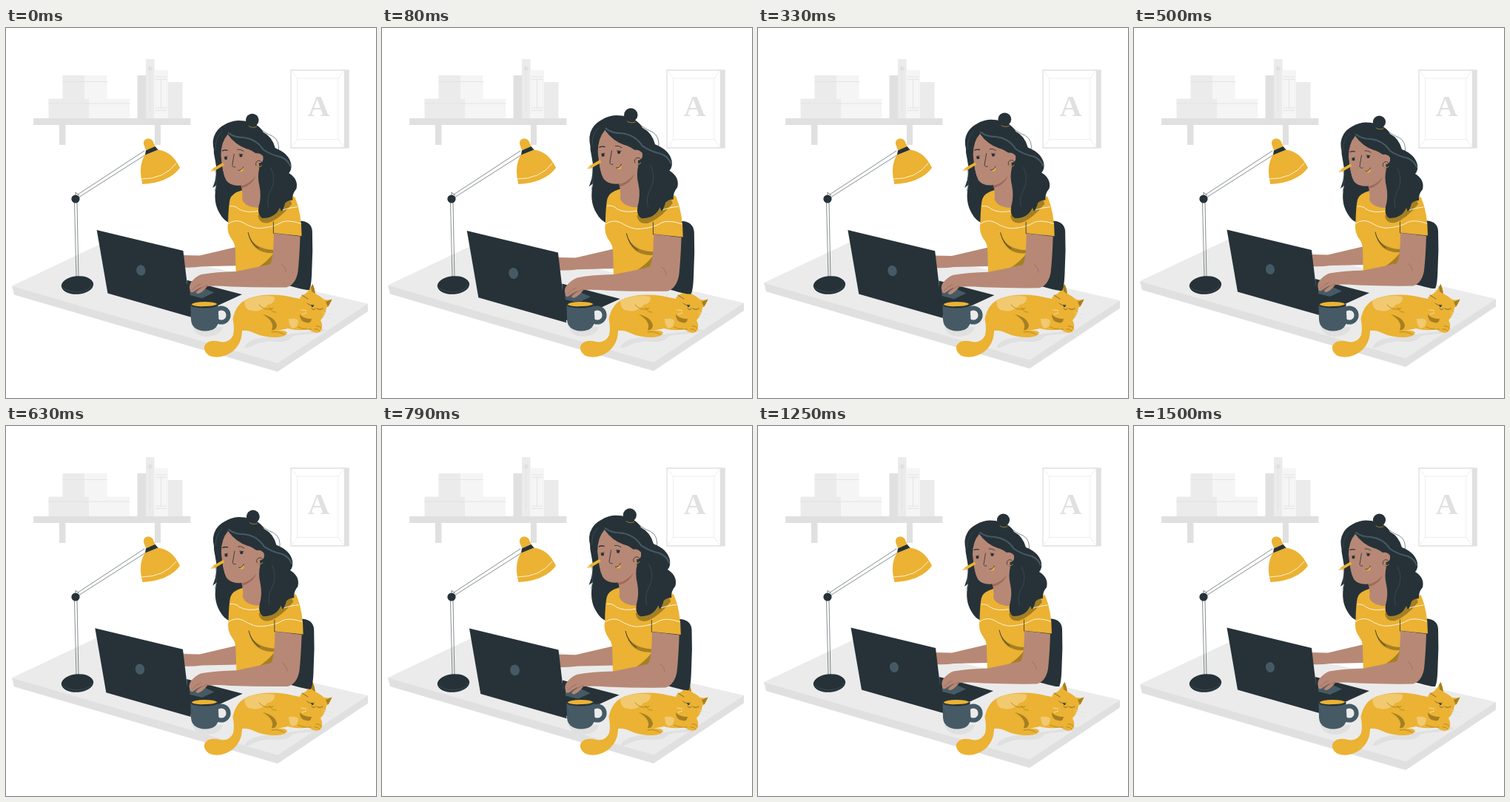
Write an HTML page that moves like this. It is 500 by 500 pixels and loops after 1540 ms.

```html
<!DOCTYPE html>
<html lang="en">
<head>
<meta charset="utf-8">
<title>Working at home</title>
<style>
  html, body { margin: 0; width: 100%; height: 100%; overflow: hidden; background: #fff; }
  svg { display: block; width: 100vw; height: 100vh; }
  .ink { fill: #263238; }
  .slate { fill: #455a64; }
  .gold { fill: #ebb233; }
  .umber { fill: #a57f22; }
  .cream { fill: #f1c96f; }
  .skin { fill: #b78876; }
  .blush { fill: #a06a59; }
  .g1 { fill: #e0e0e0; }
  .g2 { fill: #ebebeb; }
  .g3 { fill: #f5f5f5; }
  .line { fill: none; stroke: #263238; stroke-width: .8; stroke-linecap: round; stroke-linejoin: round; }
  .thin { stroke-width: .55; }
  .bold { stroke-width: 1.3; }
  .pale { stroke: #e0e0e0; }
  .white { stroke: #fff; }
  .steel { stroke: #455a64; }
  .fold { stroke: #a06a59; }
  .brown { stroke: #a57f22; }
  .amber { stroke: #ebb233; }
  #worker { transform-origin: 268px 253px; }
</style>
</head>
<body>
<svg viewBox="0 0 500 500">
  <g id="shelf">
    <path class="g1" d="M37 122h212.500v9H37zM72 131h8.500v27H72zM201 131h8v27h-8zM177.500 64H189v58h-11.500z"/>
    <path class="g2" d="M76.500 64H106v31.500H76.500zM57.500 95.500H112V122H57.500zM189 42h11.500v80H189zM219 73h19.500v49H219z"/>
    <path class="g3" d="M106 64h30.500v31.500H106zM112 95.500h55V122h-55zM200.500 57H219v65h-18.500z"/>
    <path class="line pale" d="M76.500 72.500h60M57.500 102h109.500M194.500 60v52M202 66h15M202 69.500h15M202 108h15M202 111.500h15M209.500 70v38"/>
    <circle class="g1" cx="194.500" cy="55" r="3"/>
  </g>

  <g id="picture">
    <path class="g1" d="M457.500 56.500h6.300v106h-6.300z"/>
    <path class="line pale bold" d="M385 57h72.500v105H385z"/>
    <path class="line pale thin" d="M394 68h55v82.500h-55zM385 57l9 11M457.500 57l-8.500 11M385 162l9-11.500M457.500 162l-8.500-11.500"/>
    <text class="g1" x="422.500" y="119" text-anchor="middle" font-family="'Liberation Serif', serif" font-weight="700" font-size="41">A</text>
  </g>

  <g id="desk">
    <path class="g2" d="M8 349L133 290L489 373L367 454z"/>
    <path class="g1" d="M8 349L367 453.500L489 373V383.500L367 465L11 361z"/>
  </g>

  <path class="g1" d="M252 404Q256 417 272 417Q290 416 293 404zM322 432Q327 420 350 418L388 413L430 407Q437 408 424 412L388 416Q380 426 366 424Q350 422 336 428Q328 433 322 432z"/>

  <g id="cat">
    <path class="gold" d="M306.500 393Q311 371 329 365Q350 358 378 362L397 366Q398 361 405 359Q411 353 414.500 346Q417 352 418 359Q424 362 430 367Q436 368 440.500 366.500Q438 375 433 378Q432 388 425 395Q428 401 427 404Q428 410 420 412Q413 411 409 407Q395 410 381 406Q372 408 366 409Q378 408 380 412Q379 417 366 418Q347 418 335 412Q326 408 319 409Q319 427 305 438Q290 448 275 443Q267 438 268 430Q272 421 285 423Q301 428 307 415Q309 405 306.500 393z"/>
    <path class="cream" d="M322 368Q340 359 363 363Q364 372 354 374Q344 385 333 382Q322 382 322 368zM382 393Q393 391 395 396Q395 405 387 406Q382 402 382 393z"/>
    <path class="umber" d="M347 387Q364 391 366 402Q365 409 359 408Q364 397 347 387zM397 387Q402 393 413 393Q412 400 406 398Q397 397 397 387zM412 350L414.500 346Q417 352 418 359L413 356zM432 370L440.500 366.500L435 377z"/>
    <path class="line brown" d="M342 374Q349 383 361 379M356 378Q360 385 365 384M359 411Q367 409 376 414M419 403Q424 402 426 406M417 407Q422 406 424 410M395 404Q402 408 412 407"/>
    <path class="line thin" d="M407 372Q411 376 416 374M420 379Q424 382 428 379M413 379Q416 382 418 379M400 361L408 366"/>
    <path class="ink" d="M412 374l4.500 1.500l-3 2z"/>
    <path class="line white thin" d="M406 382L399 381M406 385L400 387"/>
    <path class="line pale thin" d="M428 384L443 388M428 387L440 393"/>
  </g>

  <g id="worker">
    <path class="ink" d="M382 260L397 260.500Q410 262 411 274Q412 300 410.500 325Q410 347 407 352Q402 353 376 345z"/>

    <!-- far arm -->
    <path class="skin" d="M238 306L262 306.500L311 295V320L265 321Q252 323 238 322z"/>

    <!-- hair behind the face -->
    <path class="ink" d="M284 150Q278 162 282 178Q287 198 279 217L284 213Q279 235 288 250Q294 261 302 263L330 232H352V150z"/>

    <!-- shirt -->
    <path class="gold" d="M318 220Q304 224 302 232Q300 240 299.500 262Q297 276 305 286Q309 291 309 300L310 333L359 326L361 277L397 281Q397 250 388 229L372 222L340 236z"/>
    <path class="umber" d="M326 277Q333 298 360 299V303Q332 305 326 277zM338 323Q352 314 360 303V320zM339 254Q341 265 353 263Q368 258 384 238L380 228L345 245z"/>
    <path class="line white" d="M302 241Q309 240 314 245Q324 251 342 247M300 264Q309 258 318 262Q334 272 345 270Q362 268 369 263Q377 258 396 264M372 246Q380 243 391 242"/>
    <path class="line" d="M359.500 262V277L397 281M326 276Q329 290 340 297"/>

    <!-- neck and face -->
    <path class="skin" d="M314 204Q320 222 318 232Q323 244 344 243V190L318 198z"/>
    <path class="blush" d="M316 214Q328 212 336 201Q332 213 318 217z"/>
    <path class="skin" d="M288 160Q293 144 307 145L338 163L341 190Q334 208 320 213Q304 216 297 207Q291 195 290 177z"/>
    <ellipse class="skin" cx="341" cy="177" rx="5.500" ry="7"/>

    <!-- hair -->
    <circle class="ink" cx="331.500" cy="127" r="8.600"/>
    <path class="ink" d="M281 167Q277 154 283 144Q287 137 295 133Q303 128 313 127.500Q329 128 336 133Q343 137 346 143Q358 149 362 164Q380 171 383 185Q384 193 380 197Q393 205 390 218Q384 225 385 233Q379 233 375 237Q373 245 370 248L368 243Q362 257 345 257Q338 253 340 242Q344 228 341 214Q338 202 341 190Q347 184 346 175Q342 170 336 171Q329 166 324 165Q309 160 299 146Q290 156 290 174Q292 196 296 207Q299 220 301 234L286 237Q289 197 281 167z"/>
    <path class="line steel" style="stroke-width:2" d="M300 144Q308 150 320 150Q337 152 346 166Q356 173 370 176Q379 180 382 188"/>
    <path class="line steel thin" d="M283 165Q282 151 291 143M283 193Q285 209 282 221M356 190Q364 205 356 220Q350 231 353 242"/>
    <path class="line thin" d="M337 134Q347 144 358 148Q369 154 366 170"/>
    <path class="line amber thin" d="M327 135Q331 138 337 136"/>
    <circle class="line" cx="340.500" cy="185" r="4.300"/>
    <path class="line amber" d="M337 188Q341 191 344 187"/>

    <!-- features -->
    <circle class="ink" cx="296.500" cy="177.500" r="2"/>
    <circle class="ink" cx="316.500" cy="174" r="2"/>
    <path class="line bold" d="M292 167.500Q295 166 298.500 167"/>
    <path class="line" d="M312 166Q316 165 320 168M307.500 172L305 187Q306 190 309 189M294.500 176l4-1M314 172l5 .5"/>
    <path class="gold" d="M313.500 194Q317 194 319 189.500Q321 195 316.500 195.500z"/>
    <path class="line" d="M313 193.500Q317 194.500 319.500 189"/>
    <path class="gold" d="M279.500 191L292.500 183.500L294.500 186.500L281 194.500z"/>
    <path class="cream" d="M276 195L279.500 191L281 194.500z"/>

    <!-- laptop base -->
    <path class="ink" d="M245 339L318 358L272 379L247 386z"/>
    <path class="slate" d="M249 353L266 349L281 355.500L265 363L249 359z"/>

    <!-- near arm -->
    <path class="skin" d="M360 277L395 281Q394 310 392 328Q389 345 377 348.500Q340 349 303 347.500Q284 346 272 347Q266 355 260 357Q255 357 259 353L265 348Q258 351 253 355Q249 356 249 352Q247 346 251 341Q257 334 264 331.500Q284 328 310 327.500Q338 322 355 318Q360 310 360 277z"/>
    <path class="line fold" d="M252 352Q257 346 263 344M256 355Q262 349 272 346M370 318Q376 322 376 328"/>

    <!-- laptop lid -->
    <path class="ink" d="M125.500 272.500L240 300L250.500 388L140 356.500z"/>
    <ellipse class="slate" cx="184" cy="326" rx="6" ry="7" transform="rotate(-12 184 326)"/>
  </g>

  <g id="lamp">
    <path class="line thin" d="M97 225L187 166M98 229L189 171M92.500 236L95 336M96 236L98 336M94 222.500L99 226M94 222.500V226"/>
    <circle class="ink" cx="94" cy="231" r="5.600"/>
    <ellipse class="ink" cx="96.500" cy="347.500" rx="21.700" ry="12.300" transform="rotate(-4 96.500 347.500)"/>
    <path class="line steel thin" d="M77 351Q88 359 104 356Q114 353 117 347"/>
    <path class="gold" d="M189.500 166L186 157Q185 151 191 149.500Q197 149 199 154L202 161zM188 171L205.500 164.500Q225 167 235 189Q220 209 184.500 211Q178 187 188 171z"/>
    <path class="ink" d="M189 165.500L201.500 160L205.500 164.500L188 171.500z"/>
    <path class="line white" d="M183.500 204Q214 204 230 183"/>
  </g>

  <g id="mug">
    <circle cx="291" cy="388" r="9.600" fill="none" stroke="#455a64" stroke-width="6"/>
    <path class="slate" d="M249.500 373.500H286.500L287.500 395Q286 409.500 269 409.500Q251 409 250 394z"/>
    <ellipse class="ink" cx="268" cy="374" rx="18.500" ry="4.500"/>
    <path class="gold" d="M250.500 373.500Q254 370 268 370Q282 370 285.500 373Q281 376.500 268 376Q256 377 250.500 373.500z"/>
  </g>
</svg>
<script>
  const LOOP = 1540, STEPS = 37, CYCLE = 1500, LEAD = 30;
  const desk = document.getElementById('desk');
  const worker = document.getElementById('worker');

  // Keys are [cycle share, value]: a double heartbeat and a slow lift.
  const beat = [[0, 1], [.1, 1.1], [.3, 1], [.4, 1], [.5, 1.1], [.6, 1], [1, 1]];
  const lift = [[0, 0], [.5, -10], [1, 0]];

  function at(keys, p) {
    const i = Math.max(1, keys.findIndex(k => k[0] >= p));
    const [p0, v0] = keys[i - 1], [p1, v1] = keys[i];
    return v0 + (v1 - v0) * (p - p0) / (p1 - p0);
  }

  // Motion is held at 24 pictures a second.
  function draw() {
    const t = performance.now() % LOOP, len = LOOP / STEPS;
    const step = Math.min(STEPS - 1, Math.floor((t + 5) / len));
    const p = Math.min(1, (step * len + LEAD) / CYCLE);
    worker.style.transform = `scale(${at(beat, p)})`;
    desk.style.transform = `translateY(${at(lift, p)}px)`;
    requestAnimationFrame(draw);
  }
  draw();
</script>
</body>
</html>
```
